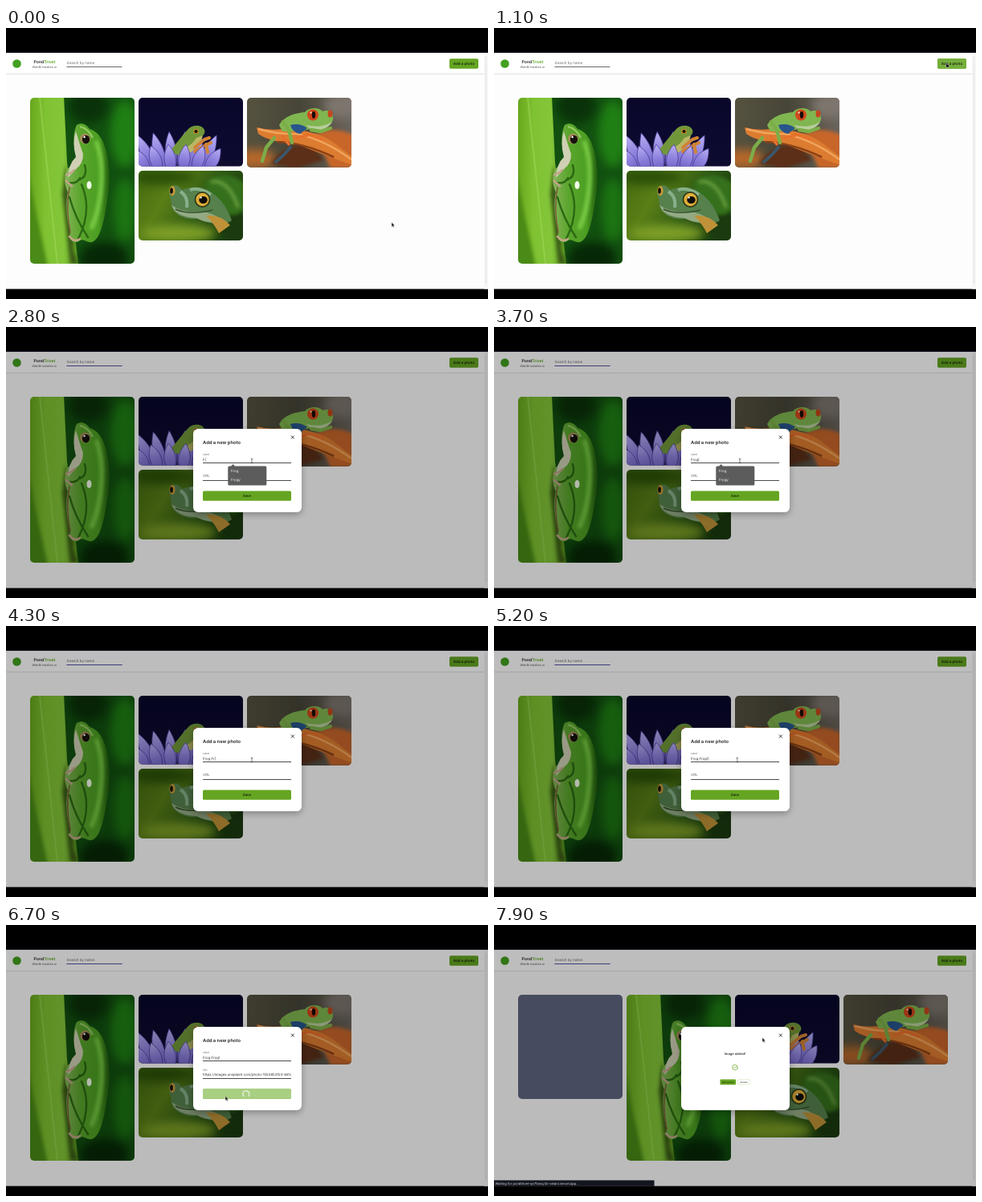
An HTML page that plays this animation: 600x338 px, repeating every 8000 ms.

```html
<!DOCTYPE html>
<html lang="en">
<head>
<meta charset="utf-8">
<title>Photo gallery</title>
<style>
  html, body { margin: 0; width: 100%; height: 100%; overflow: hidden; background: #000; }
  svg { display: block; width: 100vw; height: 100vh; }
  text { font: 400 4.4px Inter, Arial, sans-serif; fill: #333; white-space: pre; text-rendering: geometricPrecision; }
  .mid { text-anchor: middle; }
  .haze { filter: blur(.7px); }
  .soft { filter: blur(2px); }
  .softer { filter: blur(6px); }
  .line { stroke: #4c4c50; stroke-width: 1; }
  .stroke { fill: none; stroke-linecap: round; stroke-linejoin: round; }
</style>
</head>
<body>
<svg viewBox="0 0 600 338">
  <defs>
    <clipPath id="tall"><rect width="130" height="207" rx="5"/></clipPath>
    <clipPath id="wide"><rect width="130" height="87" rx="5"/></clipPath>
    <clipPath id="short"><rect width="130" height="85.6" rx="5"/></clipPath>
    <clipPath id="field"><rect x="245" y="180" width="110" height="11"/></clipPath>
    <linearGradient id="leaf">
      <stop offset="0" stop-color="#66a51c"/><stop offset=".35" stop-color="#7fc232"/>
      <stop offset=".7" stop-color="#84c63a"/><stop offset="1" stop-color="#5a9a1c"/>
    </linearGradient>
    <linearGradient id="skin">
      <stop offset="0" stop-color="#86b45a"/><stop offset=".35" stop-color="#5aa52c"/>
      <stop offset=".75" stop-color="#4c9f22"/><stop offset="1" stop-color="#245f10"/>
    </linearGradient>
    <linearGradient id="night" x2="0" y2="1">
      <stop offset="0" stop-color="#08072a"/><stop offset="1" stop-color="#0e0b30"/>
    </linearGradient>
    <linearGradient id="petal" x2="0" y2="1">
      <stop offset="0" stop-color="#b9b0f4"/><stop offset=".5" stop-color="#8d82dd"/>
      <stop offset="1" stop-color="#6a5cc0"/>
    </linearGradient>
    <linearGradient id="earth">
      <stop offset="0" stop-color="#55523f"/><stop offset=".5" stop-color="#474538"/>
      <stop offset="1" stop-color="#6b645c"/>
    </linearGradient>
    <linearGradient id="moss" y2=".4">
      <stop offset="0" stop-color="#44690f"/><stop offset=".35" stop-color="#5a7f17"/>
      <stop offset=".7" stop-color="#2f5a14"/><stop offset="1" stop-color="#1d400e"/>
    </linearGradient>
  </defs>

  <!-- page -->
  <rect y="31" width="600" height="294.5" fill="#fdfdfd"/>
  <rect y="30" width="600" height="1" fill="#1c1222"/>
  <rect y="56.6" width="595" height="1.2" fill="#e0e0e0"/>
  <rect y="31" width="595" height="25.6" fill="#fff"/>
  <rect x="595" y="31" width="5" height="294.5" fill="#f8f8f8"/>
  <rect x="596.3" y="35" width="2.4" height="284" rx="1.2" fill="#ececec"/>
  <circle cx="13.5" cy="44.5" r="5.3" fill="#43a020"/>
  <text class="mid" x="48" y="44.3" style="font-size:5.1px;font-weight:600;fill:#222">Pond<tspan fill="#57a51a">Trivet</tspan></text>
  <text class="mid" x="47.8" y="49.6" style="font-size:3.9px;fill:#666">WebBrindalles.io</text>
  <text x="75.6" y="44.6" style="font-size:4.5px;fill:#666">Search by name</text>
  <path d="M75.5 48.5H144.5" stroke="#6a6a6a"/>
  <rect x="552" y="38.2" width="36" height="12.6" rx="1.8" fill="#65a522"/>
  <rect id="hover" x="552" y="38.2" width="36" height="12.6" rx="1.8" fill="#75ae3c"/>
  <text class="mid" x="570" y="46.2" style="font-size:4.5px;font-weight:600;fill:#14260a">Add a photo</text>

  <!-- gallery -->
  <rect id="blank" x="30" y="87" width="130" height="130" rx="5" fill="#5f6680"/>
  <g id="gallery">
    <g transform="translate(30 87)" clip-path="url(#tall)">
      <rect width="130" height="207" fill="#125010"/>
      <ellipse class="softer" cx="118" cy="45" rx="18" ry="42" fill="#1f7f14"/>
      <ellipse class="softer" cx="118" cy="140" rx="14" ry="40" fill="#1c7412"/>
      <ellipse class="softer" cx="72" cy="10" rx="24" ry="22" fill="#0a3209"/>
      <ellipse class="softer" cx="92" cy="200" rx="30" ry="20" fill="#062806"/>
      <path class="haze" d="M-2 -2H42L46 80L60 209H-2Z" fill="url(#leaf)"/>
      <path class="soft" d="M-3 90Q8 150 22 210H-3Z" fill="#4a8a16"/>
      <path class="soft" d="M44 84L54 140V190L60 207H50L40 120Z" fill="#3a5a16"/>
      <path class="haze" d="M12 0L34 207" stroke="#a3d85c" stroke-width="2" opacity=".5"/>
      <path d="M58 34C64 30 70 33 74 39C84 42 90 50 94 64C101 88 99 116 95 134C91 160 86 177 77 180C71 182 66 174 61 179C53 183 48 176 50 168C45 150 44 130 47 118C42 108 42 96 47 88C56 82 58 76 57 66C53 56 54 42 58 34Z" fill="url(#skin)"/>
      <path class="haze" d="M57 42Q63 62 66 70Q66 82 58 88L47 100Q48 82 57 74Q52 56 57 42Z" fill="#cfd0b4"/>
      <path class="haze stroke" d="M62 100Q58 108 48 106M68 84Q72 98 62 102M49 124Q56 150 72 174M64 108Q78 140 60 176" stroke="#2a6812" stroke-width="2.4"/>
      <path class="stroke" d="M49 112Q44 138 50 168" stroke="#7a5636" stroke-width="1.4"/>
      <path class="haze stroke" d="M45 96Q52 94 55 90M45 104L52 110M49 173Q55 181 62 176" stroke="#c3a58a" stroke-width="2.6"/>
      <path class="soft" d="M82 54Q92 78 88 116Q86 140 76 164" fill="none" stroke="#7fd048" stroke-width="5"/>
      <ellipse class="haze" cx="73.5" cy="109" rx="3" ry="5" fill="#f2fbe8"/>
      <path class="haze" d="M62 36Q72 38 78 50" fill="none" stroke="#8fc860" stroke-width="2.5"/>
      <circle cx="68.5" cy="51" r="6.4" fill="#a98d5c"/>
      <ellipse cx="69.5" cy="52" rx="4.6" ry="5.2" fill="#15110d"/>
      <circle cx="67.6" cy="49" r="1.2" fill="#fff"/>
    </g>
    <g transform="translate(165 87)" clip-path="url(#short)">
      <rect width="130" height="87" fill="url(#night)"/>
      <g id="back"></g>
      <g class="haze">
        <path d="M38 68C46 58 54 48 61 40C66 33 79 33 82 40C84 46 78 49 73 50C73 60 62 68 52 72Z" fill="#71973a"/>
        <path d="M54 64Q66 60 72 50L80 47Q78 60 62 70Z" fill="#b9b766"/>
        <path class="stroke" d="M70 62L82 52L88 50M70 67L82 60L90 56M84 58L86 68" stroke="#d08336" stroke-width="4"/>
      </g>
      <circle cx="71.5" cy="42" r="3.2" fill="#b98a2b"/><circle cx="71.5" cy="42" r="2" fill="#17120c"/>
      <g id="front"></g>
    </g>
    <g transform="translate(300 87)" clip-path="url(#wide)">
      <rect width="130" height="87" fill="url(#earth)"/>
      <ellipse class="softer" cx="10" cy="76" rx="26" ry="12" fill="#b5672a"/>
      <ellipse class="softer" cx="118" cy="10" rx="22" ry="16" fill="#7d766e"/>
      <path class="soft" d="M84 46Q104 34 132 46V88H104Z" fill="#c8662a"/>
      <path class="soft" d="M30 82Q46 58 78 56L96 78L60 88Z" fill="#5c2f18"/>
      <path class="haze" d="M12 37Q30 42 52 38Q88 42 108 56L131 74V84Q92 70 60 57Q30 56 14 45Z" fill="#dc7c30"/>
      <path class="haze" d="M14 39Q40 46 62 45Q96 52 130 77" fill="none" stroke="#f0a45c" stroke-width="2.4"/>
      <path class="haze" d="M38 55Q70 56 108 74" fill="none" stroke="#8a4218" stroke-width="2.5"/>
      <g class="haze">
        <path d="M40 34C46 23 60 19 72 18C78 11 90 12 94 17C101 14 107 18 107 25C108 33 98 38 84 37C72 42 56 42 44 42Z" fill="#80b650"/>
        <path d="M54 34Q66 31 75 38L66 45Q56 43 54 34Z" fill="#28558c"/>
        <path d="M73 34Q92 39 106 30Q100 41 82 41Z" fill="#b8cf9c"/>
        <path class="stroke" d="M45 30L52 40L56 56M34 50L24 62L19 79M80 40L92 42L104 38" stroke="#7cae48" stroke-width="4.4"/>
        <path class="stroke" d="M54 62Q46 72 36 80" stroke="#3d5568" stroke-width="4"/>
        <path class="stroke" d="M62 50L78 46L94 52M44 48L52 58" stroke="#e8702a" stroke-width="3.4"/>
      </g>
      <circle cx="82" cy="21.5" r="7" fill="#d2481c"/><ellipse cx="83" cy="21.5" rx="2.2" ry="4.4" fill="#180c08"/>
      <ellipse cx="103.5" cy="20" rx="3" ry="4.6" fill="#c4481c"/><circle cx="79.5" cy="18.5" r="1" fill="#fff"/>
    </g>
    <g transform="translate(165 178)" clip-path="url(#wide)">
      <rect width="130" height="87" fill="url(#moss)"/>
      <ellipse class="softer" cx="30" cy="8" rx="40" ry="10" fill="#2a5008"/>
      <ellipse class="softer" cx="50" cy="78" rx="46" ry="11" fill="#7d9e26"/>
      <path class="soft" d="M84 14Q108 -4 132 16V58Q104 56 86 40Z" fill="#35701c"/>
      <path class="soft" d="M90 14Q112 10 124 46" fill="none" stroke="#69a040" stroke-width="4"/>
      <path class="soft" d="M100 66L132 50V88H110Z" fill="#1c3a10"/>
      <g class="haze">
        <path d="M38 26C40 15 50 17 54 24C66 19 84 20 92 28C104 36 112 50 116 62C106 70 88 66 74 60C58 62 42 54 41 42Z" fill="#56804c"/>
        <path d="M41 43Q56 53 76 51Q94 52 104 62Q88 68 72 59Q46 58 41 43Z" fill="#93aa84"/>
        <path d="M52 26Q62 32 60 46M64 24Q76 20 90 30" fill="none" stroke="#86b08a" stroke-width="4"/>
        <path d="M46 48Q64 56 92 49" fill="none" stroke="#35512c" stroke-width="1.6"/>
        <path d="M84 56Q102 54 114 68L100 78Q94 66 84 56Z" fill="#bf9238"/>
      </g>
      <circle cx="79.5" cy="36" r="10" fill="#2f3c1a"/>
      <circle cx="79.5" cy="36" r="8.2" fill="#e0ae38"/><ellipse cx="80.5" cy="36.5" rx="5.2" ry="4.6" fill="#0e0c08"/>
      <ellipse cx="42" cy="25" rx="3.6" ry="6" fill="#c99a3a"/><ellipse cx="41" cy="25" rx="1.9" ry="3.8" fill="#14120a"/>
      <circle cx="77.6" cy="33.4" r="1.2" fill="#fff"/>
    </g>
  </g>

  <!-- dialog -->
  <g id="dialog">
    <rect y="31" width="600" height="294.5" opacity=".26"/>
    <path d="M75.5 48.5H144.5" stroke="#3d3d78"/>
    <rect x="233" y="127" width="135" height="104" rx="6" fill="#fff" style="filter:drop-shadow(0 3px 4px rgba(0,0,0,.3))"/>
    <path class="stroke" d="M355.2 135.9l3.2 3.2m0-3.2l-3.2 3.2" stroke="#222" stroke-width=".9"/>
    <g id="form">
      <text x="245" y="145.6" style="font-size:5.8px;font-weight:600;fill:#222">Add a new photo</text>
      <text x="245" y="160" style="font-size:3.2px;fill:#666">Label</text>
      <g id="typing"></g>
      <path class="line" d="M245 169.5H355M245 191.5H355"/>
      <text id="hint" x="245" y="187.2" style="font-size:4.5px;fill:#666">URL</text>
      <text id="small" x="245" y="181.8" style="font-size:3.2px;fill:#666">URL</text>
      <text id="caret" x="244.6" y="188.4">|</text>
      <g clip-path="url(#field)"><text id="url" x="245" y="188.4" style="font-size:4.35px">https://images.unsplash.com/photo-1550853123-b81d</text></g>
      <rect x="245" y="204.6" width="110" height="12.2" rx="1.6" fill="#65a522"/>
      <text class="mid" x="300" y="212.3" style="font-weight:600;fill:#14260a">Save</text>
      <g id="busy">
        <rect x="245" y="204.6" width="110" height="12.2" rx="1.6" fill="#a9cf82"/>
        <g transform="translate(298.8 210.8)">
          <path id="spinner" class="stroke" d="M0 -4A4 4 0 1 0 4 0" stroke="#fff" stroke-width="1.1"/>
        </g>
      </g>
      <g id="menu">
        <path d="M279.5 174.5L282.5 171L285.5 174.5Z" fill="#5c5c5c"/>
        <rect x="276.3" y="173.5" width="48" height="24" rx="1.5" fill="#5c5c5c"/>
        <text x="280" y="181.2" style="fill:#f2f2f2">Frog</text>
        <text x="280" y="191.8" style="fill:#f2f2f2">Frogy</text>
      </g>
    </g>
    <g id="done">
      <text class="mid" x="300" y="161.6" style="font-size:4.1px;font-weight:500;fill:#222">Image added!</text>
      <path class="stroke" d="M303.3 177.6a3.3 3.3 0 1 1-6.6 0a3.3 3.3 0 1 1 6.6 0M298.5 177.7l1.1 1.1l2.1-2.3" stroke="#65a522" stroke-width=".7"/>
      <rect x="281.5" y="192.6" width="19.5" height="6.6" rx="1" fill="#65a522"/>
      <text class="mid" x="291.2" y="196.8" style="font-size:2.5px;font-weight:600;fill:#14260a">Add another</text>
      <rect x="303.6" y="192.8" width="15" height="6.2" rx="1" fill="#fff" stroke="#b5d391" stroke-width=".4"/>
      <text class="mid" x="311.1" y="196.8" style="font-size:2.5px;font-weight:500">Go back</text>
    </g>
  </g>

  <g id="status">
    <rect y="318.4" width="199.5" height="7.4" fill="#14161f"/>
    <text x="1.4" y="323.6" style="font-size:4.1px;fill:#dcdce0">Waiting for pondtrivet-qn75wcy3n-velani.vercel.app...</text>
  </g>

  <g id="cursor">
    <path id="arrow" d="M0 0V5.4L1.3 4.3L2.2 6.3L3.1 5.9L2.3 4L4 3.9Z" fill="#111" stroke="#fff" stroke-width=".35"/>
    <path id="hand" d="M-.2 .2Q.4 -.4 .9 .3V2.2L3.2 2.8Q3.8 3.4 3.2 6H.2L-1.2 3.6L-.2 3.8Z" fill="#111" stroke="#fff" stroke-width=".4"/>
    <path id="beam" class="stroke" d="M-.9 -2.8Q0 -2.8 0 -2.2V2.2Q0 2.8 -.9 2.8M.9 -2.8Q0 -2.8 0 -2.2M0 2.2Q0 2.8 .9 2.8" stroke="#222" stroke-width=".6"/>
  </g>
</svg>
<script>
const T = 8000, NS = 'http://www.w3.org/2000/svg';
const $ = id => document.getElementById(id);
const start = document.timeline.currentTime ?? 0;

function add(parent, tag, attrs, text = '') {
  const el = document.createElementNS(NS, tag);
  for (const k in attrs) el.setAttribute(k, attrs[k]);
  el.textContent = text;
  return parent.appendChild(el);
}

function loop(el, frames, duration = T) {
  el.animate(frames, { duration, iterations: Infinity }).startTime = start;
}

// Hard cuts: visible only inside the given [from, to] spans.
function show(el, ...spans) {
  const key = (ms, opacity) => ({ opacity, offset: ms / T, easing: 'steps(1, end)' });
  loop(el, [key(0, 0), ...spans.flatMap(([a, b]) => [key(a, 1), key(b, 0)]), key(T, 0)]);
}

// Lotus: a row of petals whose roots spread along x and lean outwards.
function petals(parent, count, length, spread, lean) {
  for (let i = 0; i < count; i++) {
    const side = i / (count - 1) - .5;
    add(parent, 'path', {
      d: `M-3 0C-11 ${-length * .45} -6 ${-length * .75} 0 ${-length}C6 ${-length * .75} 11 ${-length * .45} 3 0Z`,
      transform: `translate(${48 + side * spread} 92) rotate(${side * lean})`,
      fill: 'url(#petal)', stroke: '#43388f', 'stroke-width': .7
    });
  }
}
petals($('back'), 6, 50, 56, 50);
petals($('front'), 6, 34, 72, 64);

// Label typing
const keys = [1300, 2800, 2950, 3100, 3300, 3900, 4100, 4250, 4400, 4550, 4700];
const label = 'Frog Frog!', focusUrl = 5500;
keys.forEach((ms, n) => {
  const el = add($('typing'), 'text', { x: n ? 245 : 244.6, y: 166.7 }, label.slice(0, n) + '|');
  show(el, [ms, keys[n + 1] ?? focusUrl]);
});
show(add($('typing'), 'text', { x: 245, y: 166.7 }, label), [focusUrl, T]);

show($('hover'), [850, 1300]);
show($('menu'), [2800, 3900]);
show($('hint'), [0, focusUrl]);
show($('small'), [focusUrl, T]);
show($('caret'), [focusUrl, 5800]);
show($('url'), [5800, T]);
show($('busy'), [6500, T]);
show($('form'), [0, 7400]);
show($('done'), [7400, T]);
show($('blank'), [7800, T]);
show($('status'), [7700, T]);
loop($('spinner'), [{ transform: 'rotate(0deg)' }, { transform: 'rotate(360deg)' }], 800);

loop($('dialog'), [[0, 0], [1200, 0], [1400, 1], [T, 1]]
  .map(([ms, opacity]) => ({ opacity, offset: ms / T })));

loop($('gallery'), [[0, 0], [7800, 135], [T, 135]].map(([ms, x]) =>
  ({ transform: `translate(${x}px, 0px)`, offset: ms / T, easing: 'steps(1, end)' })));

const path = [
  [0, 480, 242.5], [200, 480, 242.5], [900, 563, 43], [1250, 563, 43], [1580, 319, 165],
  [1900, 319, 165], [2400, 306, 167], [4800, 306, 167], [5100, 302.7, 167], [5250, 302.7, 167],
  [5450, 298, 187], [5900, 298, 187], [6350, 273, 213.5], [7300, 273, 213.5], [7700, 334, 140.5], [T, 334, 140.5]
];
loop($('cursor'), path.map(([ms, x, y]) =>
  ({ transform: `translate(${x}px, ${y}px)`, offset: ms / T, easing: 'ease-in-out' })));
show($('hand'), [850, 1300], [6250, 6500]);
show($('beam'), [1520, 6050]);
show($('arrow'), [0, 850], [1300, 1520], [6050, 6250], [6500, T]);
</script>
</body>
</html>
```
